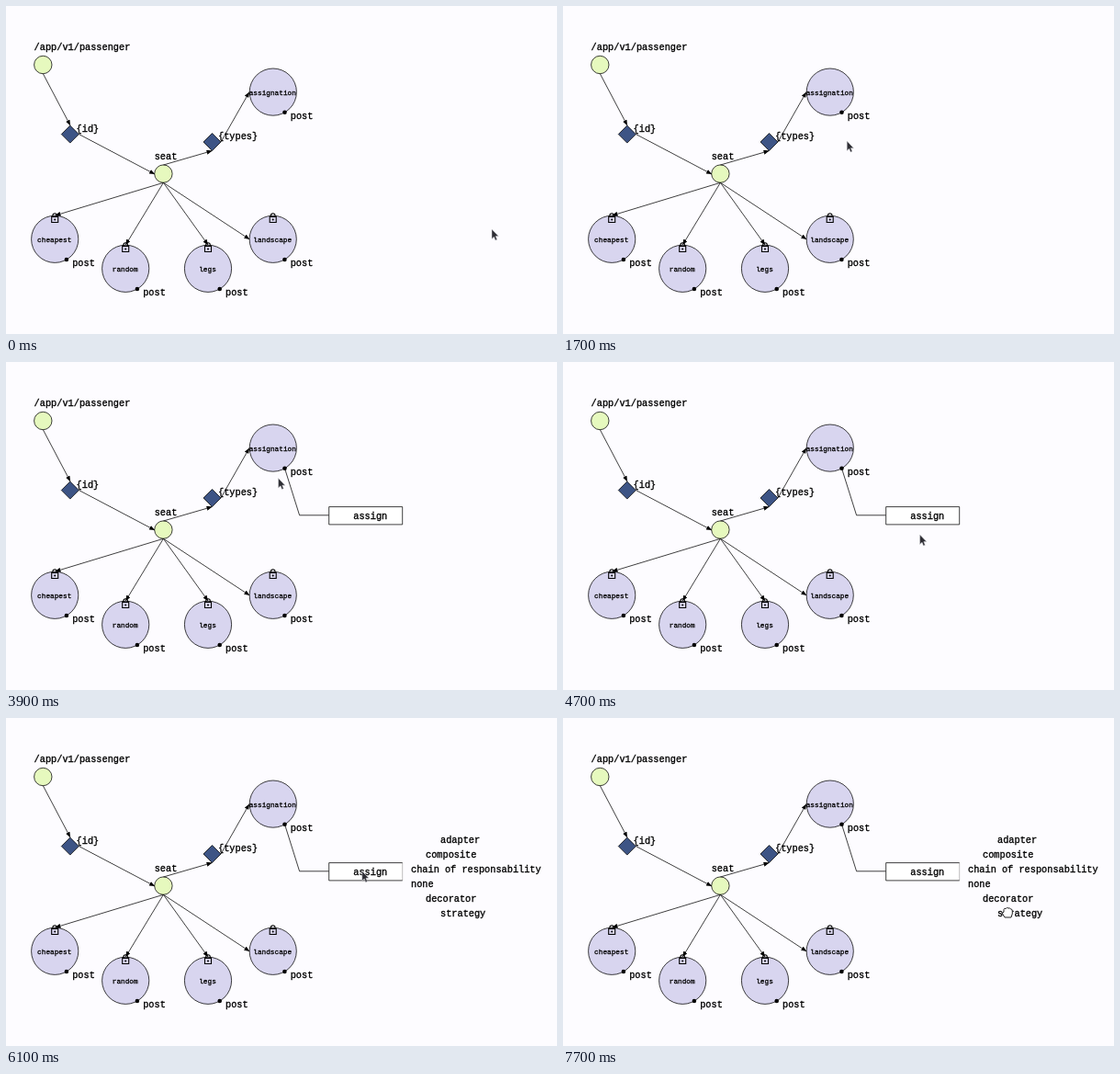
These frames come from a looping animation (600 by 357 pixels, 8 s). An HTML page:

```html
<!DOCTYPE html>
<html lang="en">
<head>
<meta charset="utf-8">
<style>
  html, body { margin: 0; width: 100%; height: 100%; overflow: hidden; background: #fdfcff; }
  svg { display: block; }
  text { font: 10.27px "Liberation Mono", monospace; stroke: #000; stroke-width: .32; white-space: pre; }
  .name { font-size: 7.75px; text-anchor: middle; stroke-width: .28; }
  .line { fill: none; stroke: #000; stroke-width: .75; }
  .shape { stroke: #000; stroke-width: .75; }
</style>
</head>
<body>
<svg width="600" height="357" viewBox="0 0 600 357">
  <defs>
    <marker id="tip" viewBox="0 0 6 5" refX="6" refY="2.5" markerWidth="6" markerHeight="5"
      markerUnits="userSpaceOnUse" orient="auto"><path d="M0 0L6 2.5L0 5Z"/></marker>
  </defs>
  <g id="graph"></g>
  <g id="box">
    <path class="line" d="M303.6 116L319.6 166.8H351.7"/>
    <path class="line" d="M431.7 157.6H351.7V176.9H431.7" style="fill:#fff"/>
    <path id="edge" class="line" d="M431.7 157.6V176.9"/>
    <text x="378.3" y="171">assign</text>
  </g>
  <g id="list"></g>
  <path id="arrow" d="M0 0V10.4L2.4 8.3L3.9 12L5.7 11.3L4.2 7.6H7.3Z" fill="#2d2d33" stroke="#d5d4da" stroke-width=".5"/>
  <path id="hand" d="M-3 5.5L-5.5 1.5Q-6-.5-4-.2V-3Q-3.4-5-1.8-4Q-.5-6 1-4.4Q2.6-5.4 3.4-3.6Q5.4-3.6 5.3-1.5V1.5L4 5.5Z"
    fill="#fff" stroke="#222" stroke-linejoin="round"/>
</svg>
<script>
const $ = id => document.getElementById(id);
const label = (x, y, s) => `<text x="${x}" y="${y}">${s}</text>`;
const link = d => `<path class="line" d="${d}" marker-end="url(#tip)"/>`;
const resource = (x, y) => `<circle class="shape" cx="${x}" cy="${y}" r="9.7" fill="#e6f9be"/>`;
const param = (x, y) => `<path class="shape" fill="#3d5485" d="M${x} ${y - 9.5}l9.5 9.5l-9.5 9.5l-9.5-9.5Z"/>`;
const lock = (x, y) => `<g transform="translate(${x} ${y})">
  <path d="M-3.5-1.9H3.5V4.2H-3.5ZM-2.3-1.9V-3.2a2.3 2.3 0 0 1 4.6 0V-1.9" fill="none" stroke="#000" stroke-width="1.1"/>
  <circle cy="1.2" r="1"/></g>`;
const action = (x, y, name, locked) => `<circle class="shape" cx="${x}" cy="${y}" r="25.6" fill="#d8d5ef"/>
  <circle cx="${x + 12.7}" cy="${y + 22.2}" r="2.3"/>
  <text class="name" x="${x - .5}" y="${y + 3.1}">${name}</text>`
  + label(x + 19, y + 29, 'post') + (locked ? lock(x, y - 22.5) : '');

$('graph').innerHTML = [
  action(290.8, 93.6, 'assignation'),
  action(53.2, 253.8, 'cheapest', true),
  action(130.2, 285.8, 'random', true),
  action(220, 285.8, 'legs', true),
  action(290.7, 253.8, 'landscape', true),
  resource(40.3, 64), resource(171.4, 182.6),
  param(69.8, 139.6), param(224.5, 148),
  ...['M40.3 73.6L70 130', 'M79.3 139.5L162 183', 'M171.4 173L224.5 157.6', 'M234 148L265 93.6'].map(link),
  ...['53.5 228', '130.3 260', '220 260', '265.3 254'].map(end => link('M171.4 192.3L' + end)),
  label(30.6, 48, '/app/v1/passenger'), label(76.6, 136.8, '{id}'),
  label(231, 145.3, '{types}'), label(161.7, 166.8, 'seat')
].join('');

// Entries fan out along a chevron, 16px per row
$('list').innerHTML = ['adapter', 'composite', 'chain of responsability', 'none', 'decorator', 'strategy']
  .map((s, i) => label(433 + 16 * Math.abs(i - 2.5), 135.6 + 16 * i, s)).join('');

// Pointer moves: start, end, destination, optional Bezier controls
const moves = [
  [0, 200, [502, 231]],
  [400, 900, [347, 190], [430, 200], [360, 180]],
  [1100, 2000, [296, 132]],
  [2000, 2900, [303, 117], [304.5, 120], [304.5, 120]],
  [3800, 4900, [371, 166.7], [260, 148], [445, 230]],
  [5800, 6600, [424, 166.7]],
  [6900, 7700, [484, 211.5]]
];

function pointer(t) {
  let at = [529, 243];
  for (const [start, end, to, c1 = at, c2 = to] of moves) {
    if (t <= start) break;
    const k = Math.min(1, (t - start) / (end - start)), m = 1 - k;
    at = at.map((v, i) => m ** 3 * v + 3 * m * m * k * c1[i] + 3 * m * k * k * c2[i] + k ** 3 * to[i]);
  }
  return at;
}

const show = (id, on) => $(id).setAttribute('visibility', on ? 'visible' : 'hidden');

function draw(now) {
  const t = Math.floor(now % 8000 / 100) * 100;
  const place = `translate(${pointer(t)})`;
  const open = t >= 4800, grab = t >= 7700;
  show('box', t >= 3500);
  show('edge', t >= 3500);
  $('edge').style.opacity = open ? .35 : 1;
  show('list', open);
  show('arrow', !grab);
  show('hand', grab);
  for (const id of ['arrow', 'hand']) $(id).setAttribute('transform', place);
  requestAnimationFrame(draw);
}
draw(performance.now());
</script>
</body>
</html>
```
